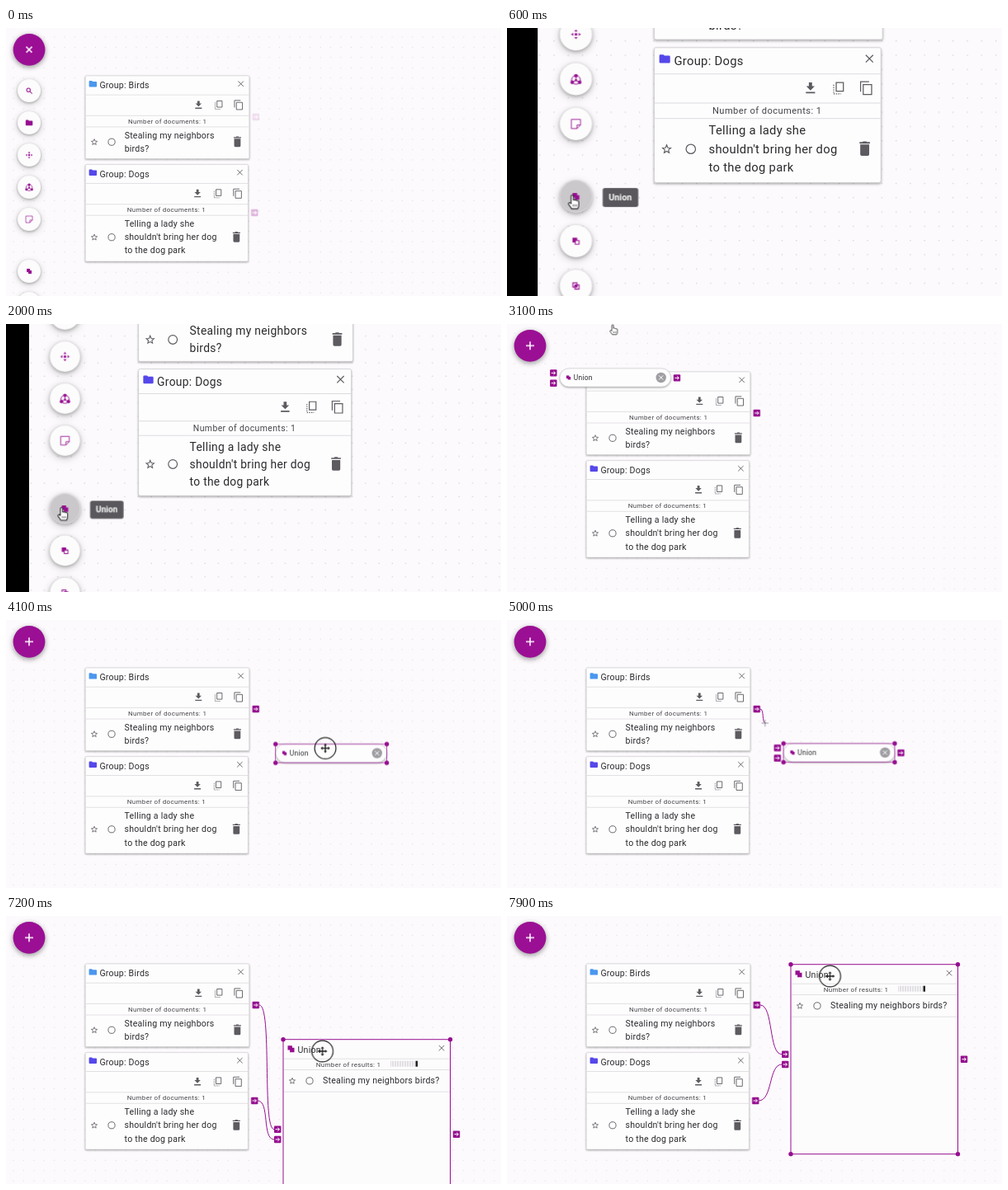
These frames come from a looping animation (600x325 px, 8 s). An HTML page:

```html
<!DOCTYPE html>
<html lang="en">
<head>
<meta charset="utf-8">
<title>Union of two groups</title>
<style>
html, body { margin: 0; width: 100%; height: 100%; overflow: hidden; background: #000; }
svg { display: block; width: 100vw; height: 100vh; }
text { font-family: Roboto, Arial, sans-serif; fill: #2b2a2d; }
.body { font-size: 10.6px; letter-spacing: .21px; }
.count { font-size: 8px; letter-spacing: .31px; fill: #454348; }
.label { font-size: 8.4px; letter-spacing: .3px; }
.tip { font-size: 7.7px; font-weight: 600; fill: #fff; }
.card { fill: #fefdfe; stroke: #cfcdd1; stroke-width: .6; filter: drop-shadow(0 1px 1px #0005); }
.round { fill: #fdfcfd; filter: drop-shadow(0 1.5px 1.5px #0004) drop-shadow(0 2px 4px #0003); }
.rule { stroke: #dcdade; stroke-width: .8; fill: none; }
.line { fill: none; stroke: #5d5b60; stroke-width: .9; }
.solid { fill: #5d5b60; }
.p { fill: #960e90; }
.pl { fill: none; stroke: #960e90; stroke-width: 1; }
.w { fill: none; stroke: #fff; stroke-width: 1; }

#world, #world * { animation-duration: 8s; animation-iteration-count: infinite; }
#world { transform-origin: -113px 526px; animation-name: zoom; animation-timing-function: ease; }
#plus { animation-name: plus; }
#menu { animation-name: menu; }
#hover, #tip { animation-name: hover; animation-timing-function: step-end; }
#portA { animation-name: portA; animation-timing-function: step-end; }
#portB { animation-name: portB; animation-timing-function: step-end; }
#node { animation-name: node; animation-timing-function: ease-in-out; }
#nodeBox { animation-name: nodeBox; animation-timing-function: step-end; }
#nodePorts { animation-name: nodePorts; animation-timing-function: step-end; }
#nodeSel { animation-name: nodeSel; animation-timing-function: step-end; }
#result { animation-name: result; animation-timing-function: ease-in-out; }
#resultBox { animation-name: resultBox; animation-timing-function: step-end; }
#wireA { animation-name: wireA; animation-timing-function: ease-in-out; }
#wireB { animation-name: wireB; animation-timing-function: ease-in-out; }
#cursor { animation-name: cursor; animation-timing-function: ease-in-out; }
#hand { animation-name: hand; animation-timing-function: step-end; }
#move { animation-name: move; animation-timing-function: step-end; }
#cross { animation-name: cross; animation-timing-function: step-end; }

@keyframes zoom {
  0% { transform: scale(1); }
  12.5%, 22.76% { transform: scale(1.444); }
  33.75%, 100% { transform: scale(1); }
}
@keyframes plus {
  0%, 34.8% { transform: rotate(45deg); }
  36.5%, 100% { transform: rotate(0deg); }
}
@keyframes menu { 0%, 34.8% { opacity: 1; } 36.2%, 100% { opacity: 0; } }
@keyframes hover { 0% { opacity: 0; } 4.6% { opacity: 1; } 34.8%, 100% { opacity: 0; } }
@keyframes portA { 0% { opacity: .12; } 1.2% { opacity: 0; } 35%, 100% { opacity: 1; } }
@keyframes portB { 0% { opacity: .28; } 1.2% { opacity: 0; } 72% { opacity: .75; } 74.5%, 100% { opacity: 1; } }
@keyframes node {
  0%, 44% { transform: translate(64px, 54px); }
  51.25% { transform: translate(327px, 150.5px); }
  53%, 100% { transform: translate(335.5px, 149.7px); }
}
@keyframes nodeBox { 0% { opacity: 0; } 35% { opacity: 1; } 80.6%, 100% { opacity: 0; } }
@keyframes nodePorts { 0% { opacity: 1; } 44% { opacity: 0; } 53.7%, 100% { opacity: 1; } }
@keyframes nodeSel { 0% { opacity: 0; } 43.6%, 100% { opacity: 1; } }
@keyframes result {
  0%, 90% { transform: translate(336px, 149.7px); }
  97.5%, 100% { transform: translate(344px, 58.7px); }
}
@keyframes resultBox { 0% { opacity: 0; } 80.6%, 100% { opacity: 1; } }
@keyframes wireA {
  0%, 59.9% { opacity: 0; d: path("M307 108C307 108 307 108 307 108"); }
  60% { opacity: 1; d: path("M307 108C307 108 307 108 307 108"); }
  66%, 80.59% { d: path("M307 108C321 108 311 155 325 155"); }
  80.6%, 90% { d: path("M307 108C323 108 310 258.7 325 258.7"); }
  97.5%, 100% { opacity: 1; d: path("M307 108C323 108 317 167.7 333 167.7"); }
}
@keyframes wireB {
  0%, 74.4% { opacity: 0; d: path("M305 224C305 224 305 224 305 224"); }
  74.5% { opacity: 1; d: path("M305 224C305 224 305 224 305 224"); }
  79.3%, 80.59% { d: path("M305 224C320 224 310 167.5 325 167.5"); }
  80.6%, 90% { d: path("M305 224C320 224 310 271 325 271"); }
  97.5%, 100% { opacity: 1; d: path("M305 224C322 224 317 180 333 180"); }
}
@keyframes cursor {
  0% { transform: translate(45px, 345px); }
  5%, 35% { transform: translate(26.2px, 300px); }
  38.75% { transform: translate(129.5px, 7px); }
  43%, 44% { transform: translate(124px, 59px); }
  51.25% { transform: translate(387px, 155.5px); }
  53%, 54% { transform: translate(395.5px, 154.7px); }
  59%, 60% { transform: translate(304px, 108px); }
  66%, 67% { transform: translate(328px, 155px); }
  72.5%, 74.5% { transform: translate(304px, 224px); }
  79.3%, 81% { transform: translate(328px, 167.5px); }
  88%, 90% { transform: translate(383.5px, 164px); }
  97.5%, 100% { transform: translate(391.5px, 73px); }
}
@keyframes hand { 0% { opacity: 1; } 43.4%, 100% { opacity: 0; } }
@keyframes move { 0% { opacity: 0; } 43.4% { opacity: 1; } 56% { opacity: 0; } 86%, 100% { opacity: 1; } }
@keyframes cross { 0% { opacity: 0; } 56% { opacity: 1; } 86%, 100% { opacity: 0; } }
</style>
</head>
<body>
<svg viewBox="0 0 600 325" preserveAspectRatio="none">
<defs>
  <pattern id="dots" width="12.4" height="12.4" patternUnits="userSpaceOnUse" x="3" y="5">
    <circle cx="6" cy="6" r=".55" fill="#cfccd2"/>
  </pattern>
  <pattern id="bars" width="3" height="8" patternUnits="userSpaceOnUse">
    <rect width="2.2" height="8" fill="#e2e0e4"/>
  </pattern>
  <g id="x"><path class="line" d="M-3.2-3.2 3.2 3.2M3.2-3.2-3.2 3.2"/></g>
  <path id="folder" d="M-4.7-2.9q0-.9.9-.9h2.6l1 1h4q.9 0 .9.9v4.6q0 .9-.9.9h-7.6q-.9 0-.9-.9z"/>
  <g id="star"><path class="line" style="stroke-width:.8" d="M0-3.6 1-1.1 3.6-.9 1.6.8 2.2 3.3 0 2-2.2 3.3-1.6.8-3.6-.9-1-1.1z"/></g>
  <g id="trash"><path class="solid" d="M-4.5-5.9H-2l.7-.7h2.6l.7.7h2.5v1.3h-9zM-3.9-3.8h7.8v8.5q0 1.3-1.3 1.3h-5.2q-1.3 0-1.3-1.3z"/></g>
  <g id="port">
    <rect class="p" x="-4.2" y="-4.2" width="8.4" height="8.4" rx="1"/>
    <path class="w" d="M-2.6 0H2.2M.2-2 2.3 0 .2 2"/>
  </g>
  <g id="union"><path class="p" d="M-4-4h5.4v2.6h2.6v5.4h-5.4v-2.6h-2.6z"/></g>
  <g id="check">
    <use href="#star"/>
    <circle class="line" cx="21" r="4.1"/>
  </g>
  <g id="corner"><circle class="p" r="2.7"/></g>
  <g id="btn"><circle class="round" r="14"/></g>
  <!-- right-aligned tools of a group card -->
  <g id="tools">
    <use href="#x" x="284.6" y="67.8"/>
    <path class="solid" d="M231.9 88.5h2.8v3.2h2.3l-3.7 3.7-3.7-3.7h2.3zM229.3 96.7h8v1.3h-8z"/>
    <path class="line" d="M255.7 88.5h6.2v7.6h-6.2z"/>
    <path class="line" stroke-dasharray="1 1" d="M253.5 90.5v8h6.5"/>
    <path class="line" d="M279.2 90.3h7.3v8.7h-7.3zM276.9 96.5v-8.6h7.4"/>
    <text class="count" x="148" y="115.8">Number of documents: 1</text>
  </g>
</defs>

<g id="world">
  <rect x="-5.2" y="-20" width="700" height="440" fill="#fcfafc"/>
  <rect x="-5.2" y="-20" width="700" height="440" fill="url(#dots)"/>

  <!-- first group -->
  <rect class="card" x="96.2" y="58" width="198.6" height="100.5" rx="1.5"/>
  <path class="rule" d="M96.5 81.2h198M96.5 106.4h198M96.5 120h198"/>
  <use href="#folder" x="105.3" y="68" fill="#4a97ee"/>
  <text class="body" x="113.4" y="73.3">Group: Birds</text>
  <use href="#tools"/>
  <use href="#check" x="107" y="138.3"/>
  <text class="body" x="143.6" y="134">Stealing my neighbors</text>
  <text class="body" x="143.6" y="150">birds?</text>
  <use href="#trash" x="280.4" y="138.2"/>

  <!-- second group -->
  <rect class="card" x="96.2" y="165.6" width="197.2" height="117.4" rx="1.5"/>
  <path class="rule" d="M96.5 188.5h196.6M96.5 213.8h196.6M96.5 227.3h196.6"/>
  <use href="#folder" x="105.3" y="175.4" fill="#5548ea"/>
  <text class="body" x="113.4" y="180.8">Group: Dogs</text>
  <use href="#tools" x="-1.2" y="107.4"/>
  <use href="#check" x="107" y="253.8"/>
  <text class="body" x="143.6" y="241.3">Telling a lady she</text>
  <text class="body" x="143.6" y="257.4">shouldn't bring her dog</text>
  <text class="body" x="143.6" y="273.5">to the dog park</text>
  <use href="#trash" x="279.3" y="253.7"/>

  <use id="portA" href="#port" x="302.7" y="108"/>
  <use id="portB" href="#port" x="301.2" y="224"/>

  <!-- operator node -->
  <g id="node"><g id="nodeBox">
    <rect class="card" width="134.5" height="22" rx="11"/>
    <use href="#union" transform="translate(10.5 11) scale(.65)"/>
    <text class="label" x="16.8" y="14">Union</text>
    <circle cx="122.7" cy="11" r="6.2" fill="#a09ea2"/>
    <path class="w" d="M120.2 8.5l5 5m0-5l-5 5"/>
    <g id="nodePorts">
      <use href="#port" x="-7.7" y="5.4"/>
      <use href="#port" x="-7.7" y="17.7"/>
      <use href="#port" x="142" y="11.4"/>
    </g>
    <g id="nodeSel">
      <rect class="pl" x="-.3" y="0" width="134.8" height="22.8" style="stroke-width:.7"/>
      <use href="#corner" x="-.3"/><use href="#corner" x="134.5"/>
      <use href="#corner" x="-.3" y="22.8"/><use href="#corner" x="134.5" y="22.8"/>
    </g>
  </g></g>

  <!-- result card -->
  <g id="result"><g id="resultBox">
    <rect class="pl" width="202.5" height="230" style="fill:#fdfcfd"/>
    <path class="rule" d="M1 23.5h201M1 36.8h201M1 63.5h201"/>
    <use href="#union" x="9.5" y="11.5"/>
    <text class="body" x="17.5" y="16.3">Union</text>
    <use href="#x" x="192" y="10.5"/>
    <text class="count" x="39.8" y="33.2">Number of results: 1</text>
    <rect x="130" y="26" width="30" height="7" fill="url(#bars)"/>
    <rect x="160.5" y="26" width="2.5" height="7" fill="#222"/>
    <use href="#check" x="11" y="50.2"/>
    <text class="body" x="48" y="53.8">Stealing my neighbors birds?</text>
    <use href="#corner"/><use href="#corner" x="202.5"/>
    <use href="#corner" y="230"/><use href="#corner" x="202.5" y="230"/>
    <use href="#port" x="-6.8" y="109"/>
    <use href="#port" x="-6.8" y="121.3"/>
    <use href="#port" x="210" y="115"/>
  </g></g>

  <path id="wireA" class="pl" d="M307 108C307 108 307 108 307 108"/>
  <path id="wireB" class="pl" d="M305 224C305 224 305 224 305 224"/>

  <!-- tool menu -->
  <g id="menu">
    <use href="#btn" x="28" y="76"/>
    <g class="pl"><circle cx="27.2" cy="75.2" r="2.2"/><path d="M29 77l2.6 2.6"/></g>
    <use href="#btn" x="28" y="115"/>
    <use href="#folder" class="p" transform="translate(28 115) scale(.9)"/>
    <use href="#btn" x="28" y="154"/>
    <g class="p" transform="translate(28 154) scale(.92)">
      <circle r="1.3"/>
      <path d="M0-4.6 1.5-2.6h-3zM0 4.6 1.5 2.6h-3zM-4.6 0-2.6-1.5v3zM4.6 0 2.6-1.5v3z"/>
    </g>
    <use href="#btn" x="28" y="193"/>
    <g transform="translate(28 193)">
      <path class="pl" style="stroke-width:.7" d="M-1.2-3.3Q-4-2-4 1.5M1.2-3.3Q4-2 4 1.5M-2 4Q0 4.8 2 4M0-1.5V1M-2.5 2.5 0 1l2.5 1.5"/>
      <g class="p"><circle cy="-3" r="1.6"/><circle cx="-3.2" cy="2.7" r="1.6"/><circle cx="3.2" cy="2.7" r="1.6"/><circle cy=".8" r="1"/></g>
    </g>
    <use href="#btn" x="28" y="232"/>
    <path class="pl" style="stroke-width:.65" d="M24 228h8v4.9l-3.1 3.1H24zM32 232.9h-3.1v3.1"/>
    <use href="#btn" x="28" y="295"/>
    <circle id="hover" cx="28" cy="295" r="14" fill="#cbc8cc"/>
    <use href="#union" transform="translate(28 295) scale(.74)"/>
    <use href="#btn" x="28" y="334"/>
    <path class="p" d="M25 331h4.1v4.1H25z"/>
    <path class="pl" style="fill:#fff;stroke-width:.8" d="M27.4 333.4h3.3v3.3h-3.3z"/>
    <use href="#btn" x="28" y="373"/>
    <path class="pl" style="stroke-width:.8" d="M25.3 370.3h3.6v3.6h-3.6zM27.1 372.1h3.6v3.6h-3.6z"/>
    <path class="p" d="M27.1 372.1h1.8v1.8h-1.8z"/>
    <g id="tip">
      <rect x="51.3" y="287.7" width="31" height="16.6" rx="2" fill="#5a585c"/>
      <text class="tip" x="56.6" y="298.8">Union</text>
    </g>
  </g>

  <circle cx="28" cy="26.3" r="19.4" fill="#9b0f94" style="filter:drop-shadow(0 2px 3px #0006)"/>
  <g transform="translate(28 26.3)"><path id="plus" class="w" style="stroke-width:1.5;transform-origin:0 0" d="M-5 0H5M0-5V5"/></g>

  <!-- pointer -->
  <g id="cursor">
    <g id="hand" stroke="#222" stroke-width=".8" stroke-linejoin="round">
      <path fill="#fff" d="M-2.4.8V-5q0-1.1 1-1.1t1 1.1v3.2q.9-.7 1.6.2.9-.5 1.5.4 1.5-.4 1.6 1v3q0 1.6-1 3H-1.9Q-3 4-4.6 2.1-5 1-4 .6q.8-.2 1.6.8z"/>
      <path fill="none" stroke-width=".5" d="M-.6 2v2M.9 2v2M2.4 2v2"/>
    </g>
    <g id="move">
      <circle r="12.9" fill="none" stroke="#222" stroke-width="1.2"/>
      <path fill="none" stroke="#222" stroke-width="1.4" d="M-4 0H4M0-4V4"/>
      <path fill="#222" d="M0-5.8 2-3.4h-4zM0 5.8 2 3.4h-4zM-5.8 0-3.4-2v4zM5.8 0 3.4-2v4z"/>
    </g>
    <path id="cross" fill="none" stroke="#8d8a90" stroke-width=".9" d="M-4.2 0H4.2M0-4.2V4.2"/>
  </g>
</g>
</svg>
</body>
</html>
```
